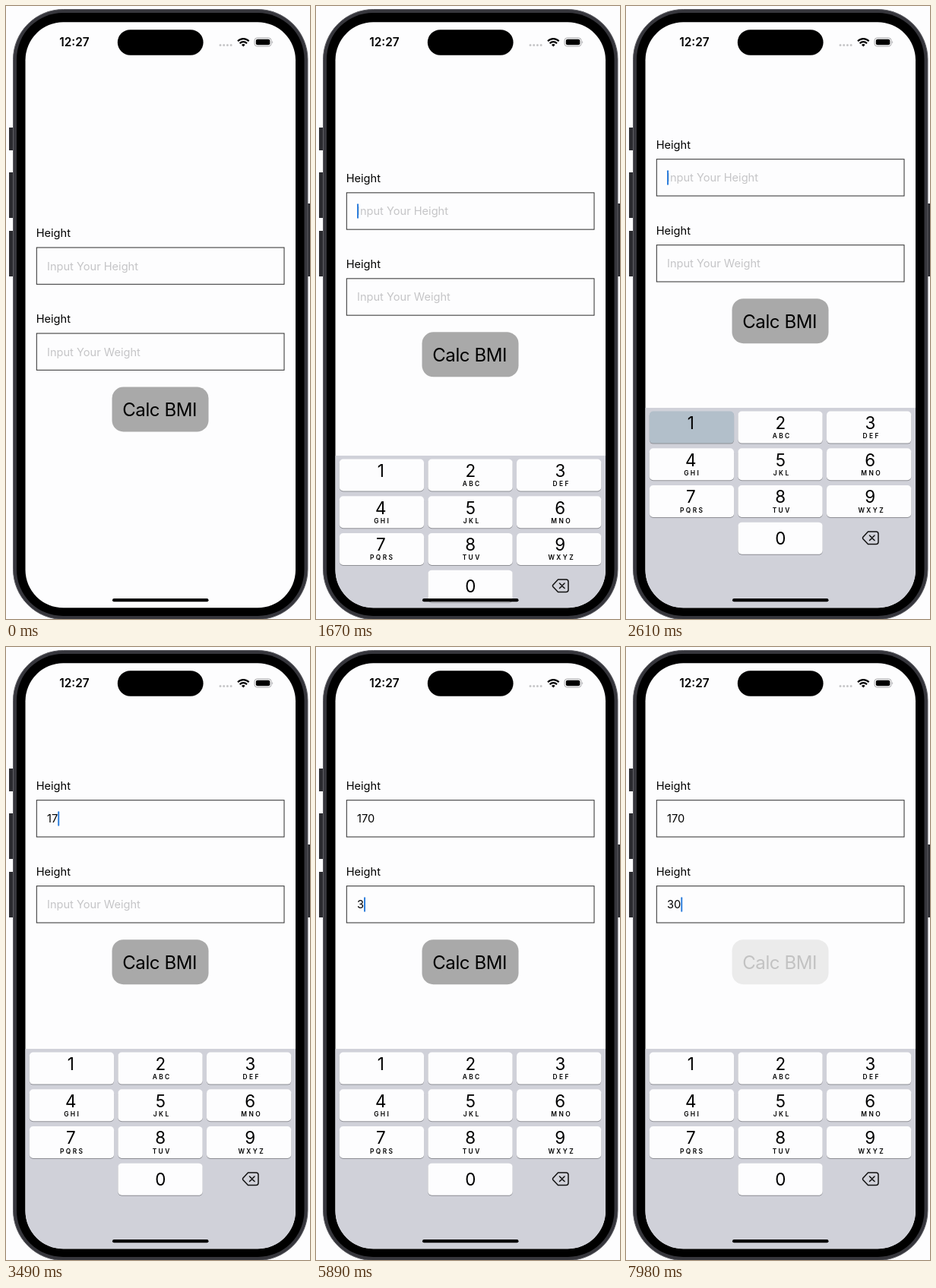
Animation, 400 px wide and 807 px high, one loop 8 s. Source, as an HTML page:

```html
<!DOCTYPE html>
<html lang="en">
<head>
<meta charset="utf-8">
<style>
  html, body { margin: 0; width: 100%; height: 100%; overflow: hidden; background: #fdfdfe; }
  svg { display: block; font-family: Inter, "Liberation Sans", sans-serif; font-size: 14.6px; }
  .field { fill: none; stroke: #2c2c2c; stroke-width: 1; }
  .digit { font-size: 22.4px; text-anchor: middle; }
  .letters { font-size: 8.4px; font-weight: 600; letter-spacing: 2.4px; text-anchor: middle; }
  .calc { font-size: 24px; letter-spacing: -.4px; }
</style>
</head>
<body>
<svg width="400" height="807" viewBox="0 0 400 807">
  <clipPath id="screen"><rect x="25.500" y="21.300" width="355.500" height="771" rx="50"/></clipPath>

  <path fill="#2b2b30" d="M4 160h7v30h-7zM4 219h7v60h-7zM4 296h7v60h-7zM396 260h4v96h-4z"/>
  <rect x="9.500" y="4.500" width="387.500" height="803" rx="66" fill="#36363c" stroke="#5c5c62"/>
  <rect x="14" y="9" width="378.500" height="794" rx="61"/>
  <rect x="25.500" y="21.300" width="355.500" height="771" rx="50" fill="#fdfdfe"/>

  <g clip-path="url(#screen)">
    <g id="form">
      <text x="39.700" y="304">Height</text>
      <rect class="field" x="40.300" y="318" width="325.700" height="48.300"/>
      <text class="value" x="54" y="347.500"></text>
      <text x="39.700" y="417">Height</text>
      <rect class="field" x="40.300" y="431" width="325.700" height="48.300"/>
      <text class="value" x="54" y="460.500"></text>
      <rect id="caret" width="2" height="19.500" rx="1" fill="#2f7fdc"/>
      <rect id="button" x="139.500" y="501.500" width="127" height="59" rx="15"/>
      <text id="label" class="calc" x="153.200" y="540">Calc BMI</text>
    </g>
    <g id="keyboard">
      <rect x="25" y="529" width="357" height="264" fill="#d0d1d9"/>
      <g id="keys"></g>
      <g fill="none" stroke="#111" stroke-width="1.500" stroke-linejoin="round" stroke-linecap="round">
        <path d="M318.500 692H329a3 3 0 0 1 3 3v10.500a3 3 0 0 1-3 3H318.500L311.800 701.500Q311 700.300 311.800 699.200Z"/>
        <path d="M320.500 697l6.500 6.500m0-6.500l-6.500 6.500"/>
      </g>
    </g>
  </g>

  <text x="70.300" y="53" font-size="15.300" font-weight="600">12:27</text>
  <rect x="146.800" y="31.200" width="112.800" height="33.500" rx="16.750"/>
  <path d="M282 51.500h16" stroke="#c6c6c8" stroke-width="3" stroke-linecap="round" stroke-dasharray="0 4.700"/>
  <g fill="none" stroke="#000" stroke-width="2.200">
    <path d="M305 46.300a10 10 0 0 1 14.600 0M307.600 49.200a6.500 6.500 0 0 1 9.400 0"/>
    <path d="M312.300 53.600l-2.400-2.500a3.500 3.500 0 0 1 4.800 0z" fill="#000" stroke="none"/>
  </g>
  <rect x="327" y="42" width="22" height="11" rx="3.500" fill="none" stroke="#a6a6a8"/>
  <rect x="328.800" y="43.700" width="18.500" height="7.600" rx="2"/>
  <path d="M350.300 45.500q1.600 2 0 4z" fill="#a6a6a8"/>
  <rect x="140" y="780" width="126.500" height="4.300" rx="2.150"/>
</svg>

<script>
const LOOP = 8000, HOLD = 120;
const FOCUS = [1450, 4900];
const BUTTON_DOWN = 7930;
// [press time, digit, field]
const taps = [[2560, 1, 0], [3330, 7, 0], [3930, 0, 0], [5640, 3, 1], [6580, 0, 1]];
const hints = ["Input Your Height", "Input Your Weight"];
const letters = ["", "", "ABC", "DEF", "GHI", "JKL", "MNO", "PQRS", "TUV", "WXYZ"];

const $ = id => document.getElementById(id);
const values = document.querySelectorAll(".value");
const keyFaces = [];

function add(tag, attrs, text = "") {
  const node = document.createElementNS("http://www.w3.org/2000/svg", tag);
  for (const name in attrs) node.setAttribute(name, attrs[name]);
  node.textContent = text;
  return $("keys").appendChild(node);
}

for (let n = 0; n < 10; n++) {
  const column = n ? (n - 1) % 3 : 1;
  const row = n ? Math.floor((n - 1) / 3) : 3;
  const x = 30.8 + column * 116.6, y = 533.6 + row * 48.7;
  const middle = 85.3 + column * 118;
  const box = { x, width: 111.3, height: 42, rx: 5 };
  add("rect", { ...box, y: y + 1, fill: "#8e8f95" });
  keyFaces[n] = add("rect", { ...box, y });
  add("text", { class: "digit", x: middle, y: n ? y + 23.3 : y + 29 }, n);
  add("text", { class: "letters", x: middle + 1.9, y: y + 35.5 }, letters[n]);
}

// Remaining share of a critically damped spring
function spring(t, start) {
  const s = Math.max(0, t - start) * 0.01826;
  return (1 + s) * Math.exp(-s);
}

function caretOpacity(age) {
  const phase = age % 1000;
  if (phase < 500) return 1;
  if (phase < 700) return (700 - phase) / 200;
  return Math.max(0, (phase - 850) / 150);
}

function draw(t) {
  $("keyboard").setAttribute("transform", `translate(0 ${264 * spring(t, 1520)})`);
  $("form").setAttribute("transform", `translate(0 ${-116.3 * (1 - spring(t, 1556))})`);

  keyFaces.forEach((face, n) => {
    const down = taps.some(([time, digit]) => digit === n && t >= time && t < time + HOLD);
    face.setAttribute("fill", down ? "#b2bfca" : "#fdfdfe");
  });

  const typed = taps.filter(([time]) => t >= time + HOLD);
  values.forEach((node, field) => {
    const text = typed.filter(tap => tap[2] === field).map(tap => tap[1]).join("");
    node.textContent = text || hints[field];
    node.setAttribute("fill", text ? "#000" : "#c5c5c7");
  });

  const active = t >= FOCUS[1] ? 1 : 0;
  const hasText = typed.some(tap => tap[2] === active);
  const width = hasText ? values[active].getComputedTextLength() : 0;
  const lastEvent = Math.max(...[...FOCUS, ...typed.map(tap => tap[0] + HOLD)].filter(time => time <= t));
  const caret = $("caret");
  caret.setAttribute("x", 54 + width);
  caret.setAttribute("y", 332.5 + active * 113);
  caret.setAttribute("opacity", t < FOCUS[0] ? 0 : caretOpacity(t - lastEvent));

  const pressed = t >= BUTTON_DOWN;
  $("button").setAttribute("fill", pressed ? "#ebebeb" : "#a9a9a9");
  $("label").setAttribute("fill", pressed ? "#c2c2c2" : "#000");
}

function tick() {
  draw(performance.now() % LOOP);
  requestAnimationFrame(tick);
}
tick();
</script>
</body>
</html>
```
